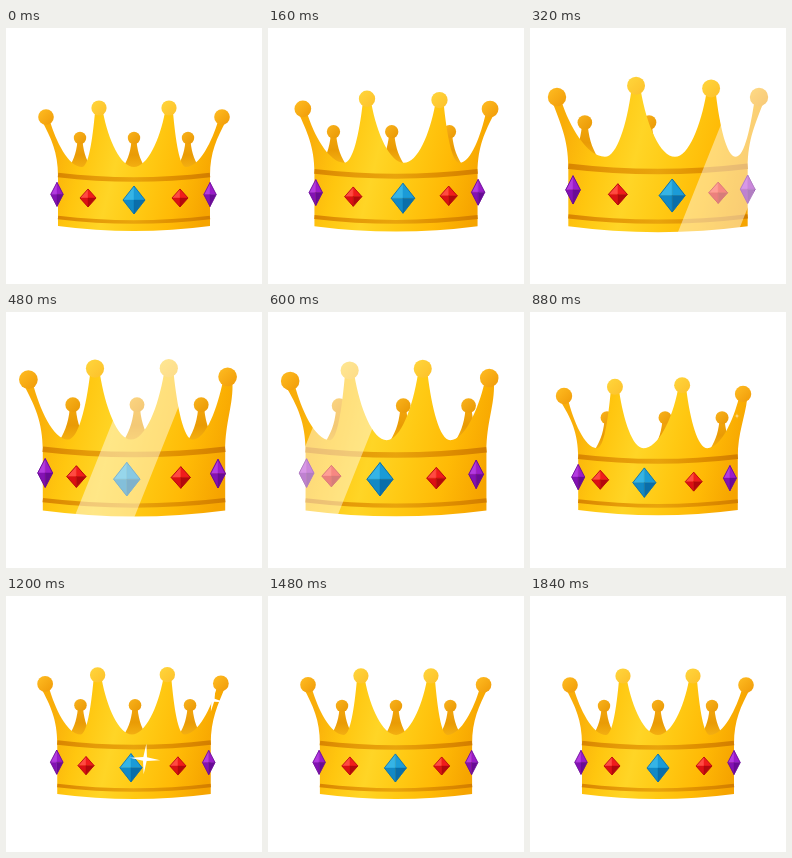
Recreate the animation shown at these times as an HTML page with a canvas. Size 256 by 256 pixels, loop 1920 ms.

```html
<!DOCTYPE html>
<html lang="en">
<head>
<meta charset="utf-8">
<title>Crown</title>
<style>
html, body { margin: 0; width: 100%; height: 100%; overflow: hidden; background: #fff; }
canvas { display: block; }
</style>
</head>
<body>
<canvas id="stage" width="256" height="256"></canvas>
<script>
const ctx = document.getElementById('stage').getContext('2d');
const LOOP = 1920, STEP = 40, PIVOT = 196;

// Each pose: time, then x offsets from the crown's axis at scale 1:
// 4 front tips, 3 valleys, 3 back tips, 5 gems.
const rest = [-88, -35, 35, 88, -52, 0, 52, -54, 0, 54, -77, -46, 0, 46, 76];
const poses = [
  [0, ...rest],
  [320, -85.6, -18.6, 45, 85.6, -45, 14.4, 66, -62, -7.6, 46, -72, -34, 12, 51, 76],
  [480, -88, -32.5, 29, 78, -55, -2.5, 49, -51, 2.5, 56, -74, -48, -6, 39, 70],
  [720, -89.5, -43, 19, 80, -55, -11, 45, -46.5, 8, 64, -76, -58, -17.5, 31, 66],
  [880, -89.5, -41, 23, 81, -58, -14, 47, -48.5, 6.7, 61, -76, -55, -13, 34, 68.5],
  [1200, -88, -36, 33, 86, -53, -2, 50, -53, 1, 55.5, -76.5, -47.5, -3, 43.5, 74],
  [1840, ...rest]
];
const scales = [[0, 1], [320, 1.18], [480, 1.2], [600, 1.19], [720, 1.14],
  [880, 1.05], [1200, 1.01], [1840, 1]];

const gems = [
  { w: 6.2, h: 12, tones: ['#b43be0', '#9a1cc9', '#8411b4', '#690b96'] },
  { w: 8, h: 9, tones: ['#ff4a42', '#f01c1c', '#dc1014', '#b3080d'] },
  { w: 11, h: 14, tones: ['#35b4e6', '#1b9bd7', '#1289c6', '#0a6eaa'] }
];

// Smooth curve through the keyed rows, at rest at both ends.
function sample(keys, t) {
  const last = keys.length - 1;
  let i = 0;
  while (i < last - 1 && t >= keys[i + 1][0]) i++;
  const a = keys[i], b = keys[i + 1], span = b[0] - a[0];
  const u = Math.min(1, (t - a[0]) / span);
  const slope = (k, c) => k === 0 || k === last ? 0
    : (keys[k + 1][c] - keys[k - 1][c]) / (keys[k + 1][0] - keys[k - 1][0]) * span;
  return a.slice(1).map((p, j) => {
    const c = j + 1, d = b[c] - p, m = slope(i, c), n = slope(i + 1, c);
    return p + u * (m + u * (3 * d - 2 * m - n + u * (m + n - 2 * d)));
  });
}

function gradient(x0, y0, x1, y1, colors) {
  const g = ctx.createLinearGradient(x0, y0, x1, y1);
  colors.forEach((c, i) => g.addColorStop(i / (colors.length - 1), c));
  return g;
}

function ball(x, y, r, light, dark) {
  ctx.fillStyle = gradient(x - r, y - r, x + r, y + r, [light, dark]);
  ctx.beginPath();
  ctx.arc(x, y, r, 0, 7);
  ctx.fill();
}

function backSpike(x) {
  ctx.fillStyle = gradient(0, 112, 0, 142, ['#f3a60b', '#e99b05', '#f6b414']);
  ctx.beginPath();
  ctx.moveTo(x - 2.5, 113);
  ctx.bezierCurveTo(x - 4, 127, x - 7, 133, x - 13, 143);
  ctx.lineTo(x + 13, 143);
  ctx.bezierCurveTo(x + 7, 133, x + 4, 127, x + 2.5, 113);
  ctx.fill();
  ball(x, 110, 6.2, '#f9b31c', '#e99704');
}

const tipY = x => 78.3 + 0.00138 * x * x;

function body(tips, valleys) {
  const edge = tips.map(x => [x, tipY(x) + 4]);
  ctx.fillStyle = gradient(-80, 110, 80, 150,
    ['#f9ad09', '#ffc60f', '#ffd526', '#ffc913', '#ffba06', '#f6a400']);
  ctx.beginPath();
  ctx.moveTo(-76, 198);
  ctx.lineTo(-76, 148);
  ctx.bezierCurveTo(-76, 124, -83, 110, edge[0][0] - 4, edge[0][1]);
  valleys.forEach((v, i) => {
    const [ax, ay] = edge[i], [bx, by] = edge[i + 1];
    const l = v - ax, r = bx - v;
    ctx.lineTo(ax + 4, ay);
    ctx.bezierCurveTo(ax + 4 + l * 0.15, 112, v - l * 0.38, 139, v, 139);
    ctx.bezierCurveTo(v + r * 0.38, 139, bx - 4 - r * 0.15, 112, bx - 4, by);
  });
  ctx.lineTo(edge[3][0] + 4, edge[3][1]);
  ctx.bezierCurveTo(83, 110, 76, 124, 76, 148);
  ctx.lineTo(76, 198);
  ctx.quadraticCurveTo(0, 208, -76, 198);
  ctx.fill();
}

function stripe(y, width) {
  ctx.strokeStyle = gradient(-76, 0, 76, 0, ['#d98500', '#e59b08', '#e9a40c', '#e09000', '#d27d00']);
  ctx.lineWidth = width;
  ctx.beginPath();
  ctx.moveTo(-76, y);
  ctx.quadraticCurveTo(0, y + 9, 76, y);
  ctx.stroke();
}

function gem(x, { w, h, tones }) {
  const y = 172 - 0.00095 * x * x;
  const facet = (dx, dy, color) => {
    ctx.fillStyle = ctx.strokeStyle = color;
    ctx.lineWidth = 0.4;
    ctx.beginPath();
    ctx.moveTo(x, y);
    ctx.lineTo(x + dx, y);
    ctx.lineTo(x, y + dy);
    ctx.closePath();
    ctx.fill();
    ctx.stroke();
  };
  facet(-w, -h, tones[0]);
  facet(w, -h, tones[1]);
  facet(-w, h, tones[2]);
  facet(w, h, tones[3]);
  ctx.strokeStyle = tones[3];
  ctx.lineWidth = 0.8;
  ctx.beginPath();
  ctx.moveTo(x - w, y);
  ctx.lineTo(x, y - h);
  ctx.lineTo(x + w, y);
  ctx.lineTo(x, y + h);
  ctx.closePath();
  ctx.stroke();
}

// Slanted band of light, only on what is already painted.
function shine(t) {
  const x = 306 - 0.495 * t;
  ctx.globalCompositeOperation = 'source-atop';
  ctx.fillStyle = 'rgba(255,250,240,.48)';
  ctx.beginPath();
  ctx.moveTo(x, 205);
  ctx.lineTo(x + 60, 205);
  ctx.lineTo(x + 124, 45);
  ctx.lineTo(x + 64, 45);
  ctx.fill();
  ctx.globalCompositeOperation = 'source-over';
}

function sparkle(x, y, size, start, end, t) {
  const u = (t - start) / (end - start);
  if (u <= 0 || u >= 1) return;
  const r = size * Math.sin(Math.PI * u), turn = 0.3 * (u - 0.1);
  ctx.fillStyle = '#fff';
  ctx.beginPath();
  for (let i = 0; i < 8; i++) {
    const a = turn + i * Math.PI / 4, d = i % 2 ? r * 0.17 : r;
    ctx.lineTo(x + d * Math.cos(a), y + d * Math.sin(a));
  }
  ctx.fill();
}

function draw(t) {
  const xs = sample(poses, t), [s] = sample(scales, t);
  const tips = xs.slice(0, 4);
  ctx.setTransform(1, 0, 0, 1, 0, 0);
  ctx.clearRect(0, 0, 256, 256);
  ctx.setTransform(s, 0, 0, s, 128, PIVOT * (1 - s));
  xs.slice(7, 10).forEach(backSpike);
  body(tips, xs.slice(4, 7));
  tips.forEach((x, i) => i % 3
    ? ball(x, tipY(x), 7.6, '#ffd63c', '#fdc02a')
    : ball(x, tipY(x), 7.8, '#ffbd22', '#f09a08'));
  stripe(147, 4.6);
  stripe(189.5, 3.6);
  xs.slice(10).forEach((x, i) => gem(x, gems[2 - Math.abs(i - 2)]));
  ctx.setTransform(1, 0, 0, 1, 0, 0);
  shine(t);
  sparkle(207, 104, 15, 850, 1340, t);
  sparkle(139, 163, 16, 1040, 1440, t);
}

function frame() {
  const t = performance.now() % LOOP;
  draw(Math.min(1840, Math.floor(t / STEP) * STEP));
  requestAnimationFrame(frame);
}
frame();
</script>
</body>
</html>
```
